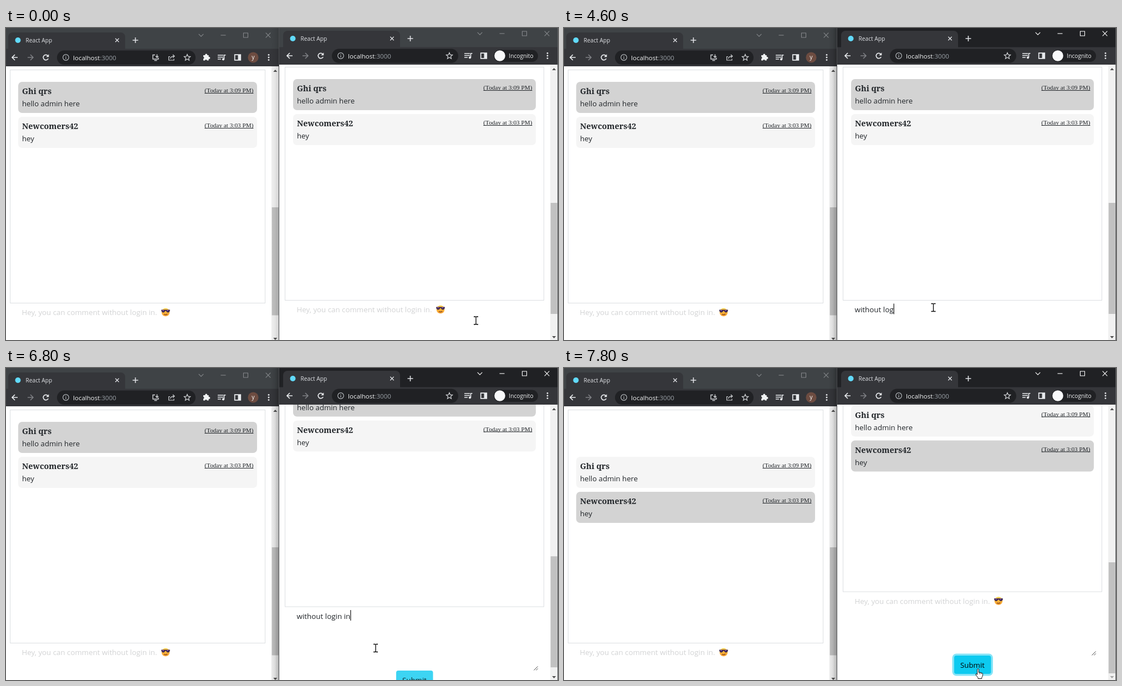
These frames come from a looping animation (996 by 562 pixels, 8 s). An HTML page with a canvas:

```html
<!DOCTYPE html>
<html lang="en">
<head>
<meta charset="utf-8">
<title>Comment box</title>
<style>
  html, body { margin: 0; width: 100%; height: 100%; overflow: hidden; background: #fff; }
  canvas { display: block; width: 996px; height: 562px; }
</style>
</head>
<body>
<canvas id="stage"></canvas>
<script>
const W = 996, H = 562, LOOP = 8000, TICK = 200 / 3;
const SANS = '"Open Sans", "Noto Sans", sans-serif';
const SERIF = '"Noto Serif", serif';
const TIMES = '"Liberation Serif", serif';

const MESSAGE = 'without login in';
const KEY_TIMES = [2000, 2200, 2470, 2670, 2930, 3400, 3600, 3730,
  4130, 4330, 4600, 4870, 5000, 5200, 5470, 5670];
const FOCUS = 1270, SCROLL_START = 6590, SCROLL_MS = 333, SCROLL_MAX = 87.5;
const HOVER = 7470, CLICK = 7730, POSTED = 7800, BLINK = 530;

const COMMENTS = [
  { name: 'Ghi qrs', body: 'hello admin here', time: '(Today at 3:09 PM)' },
  { name: 'Newcomers42', body: 'hey', time: '(Today at 3:03 PM)' },
];

// time, x, y, shape
const POINTER = [
  [0, 848, 527, 'beam'], [70, 826, 517, 'beam'], [130, 778, 491, 'beam'], [200, 757, 480, 'beam'],
  [800, 745, 484, 'beam'], [870, 722, 490, 'beam'], [930, 694, 497, 'beam'],
  [1000, 673, 502, 'beam'], [1070, 666.5, 503.5, 'beam'], [6670, 667, 504.5, 'beam'],
  [6930, 673, 507, 'beam'], [7000, 692, 513, 'beam'], [7070, 722, 530, 'hand'],
  [7130, 750, 545, 'hand'], [7200, 765.5, 552, 'arrow'], [7270, 767, 555, 'arrow'],
  [7400, 764, 554, 'arrow'], [7470, 751, 545, 'hand'], [7530, 747, 541.5, 'hand'],
];

const canvas = document.getElementById('stage');
const ctx = canvas.getContext('2d');
const dpr = window.devicePixelRatio || 1;
canvas.width = W * dpr;
canvas.height = H * dpr;

const clamp = v => Math.max(0, Math.min(1, v));
const smooth = v => v * v * (3 - 2 * v);

function rect(x, y, w, h, color) {
  ctx.fillStyle = color;
  ctx.fillRect(x, y, w, h);
}

function round(x, y, w, h, r, color) {
  ctx.beginPath();
  ctx.roundRect(x, y, w, h, r);
  ctx.fillStyle = color;
  ctx.fill();
}

function disc(x, y, r, color) {
  ctx.beginPath();
  ctx.arc(x, y, r, 0, Math.PI * 2);
  ctx.fillStyle = color;
  ctx.fill();
}

function text(str, x, y, font, color) {
  ctx.font = font;
  ctx.fillStyle = color;
  ctx.fillText(str, x, y);
  return ctx.measureText(str).width;
}

function at(x, y, draw) {
  ctx.save();
  ctx.translate(x, y);
  draw();
  ctx.restore();
}

// Paths are drawn around the given centre.
function stroke(d, x, y, color, width = 1.5) {
  at(x, y, () => {
    ctx.strokeStyle = color;
    ctx.lineWidth = width;
    ctx.stroke(new Path2D(d));
  });
}

function fill(d, x, y, color) {
  at(x, y, () => {
    ctx.fillStyle = color;
    ctx.fill(new Path2D(d));
  });
}

const CROSS = 'M-3.2 -3.2L3.2 3.2M3.2 -3.2L-3.2 3.2';
const PLUS = 'M-5 0H5M0 -5V5';
const ARROW_BACK = 'M5 0H-4.5M0 -5L-5 0L0 5';
const ARROW_NEXT = 'M-5 0H4.5M0 -5L5 0L0 5';
const RELOAD = 'M4.2 2A4.7 4.7 0 1 1 3.4 -3.2';
const STAR = 'M0 -5.6L1.6 -1.8L5.6 -1.5L2.5 1.2L3.5 5.2L0 3L-3.5 5.2L-2.5 1.2L-5.6 -1.5L-1.6 -1.8Z';
const PUZZLE = 'M-5.5 -3.5H-2.2A2 2 0 1 1 1.6 -3.5H4.2V-0.5A2 2 0 1 1 4.2 3.3V6H1.2A1.9 1.9 0 0 0 -2.5 6H-5.5V2.9A1.9 1.9 0 0 0 -5.5 -0.8Z';

function toolIcons(starX, mediaX, panelX, dotsX) {
  const ink = '#e8eaed';
  stroke(ARROW_BACK, 16, 53, ink, 1.7);
  stroke(ARROW_NEXT, 44, 53, '#7d7f83', 1.6);
  stroke(RELOAD, 72, 53, ink, 1.7);
  fill('M5.3 -5.8V-0.8H0.3Z', 72, 53, ink);
  stroke('M5.3 0A5.3 5.3 0 1 1 -5.3 0A5.3 5.3 0 1 1 5.3 0M0 -0.8V3M0 -3V-1.8', 108, 53, '#b4b8bc', 1.2);
  stroke(STAR, starX, 53, '#d0d2d5', 1.2);
  stroke('M-7 -4H3M-7 -0.5H3M-7 3H-1M4.5 3V-4.2H7.5', mediaX, 53, ink, 1.6);
  disc(mediaX + 3, 56.3, 2.1, ink);
  stroke('M-5.3 -4.8H5.3V4.8H-5.3Z', panelX, 53, ink, 1.7);
  rect(panelX + 0.6, 48.5, 4.6, 9, ink);
  for (const dy of [-4.6, 0, 4.6]) disc(dotsX, 53 + dy, 1.45, ink);
}

function windowButtons(x, color) {
  stroke('M-4.3 -2.2L0 2.2L4.3 -2.2', x, 13, color, 1.1);
  stroke('M-4.5 0H4.5', x + 40, 13, color, 1.1);
  stroke('M-4 -4H4V4H-4Z', x + 80.5, 13, color, 1.1);
  stroke('M-4.3 -4.3L4.3 4.3M4.3 -4.3L-4.3 4.3', x + 121, 13, color, 1.1);
}

function chrome(left, right, active, pillEnd, buttonsX) {
  rect(left, 0, right - left, 38, active ? '#202124' : '#3f4346');
  rect(left, 37.5, right - left, 31.5, '#35363a');
  round(4, 8, 211, 31, [8, 8, 0, 0], '#35363a');
  disc(21.5, 22, 5, '#61dafb');
  text('React App', 35.5, 26, `10.2px ${SANS}`, '#dfe1e5');
  stroke(CROSS, 200.5, 22, '#dfe1e5', 1.3);
  stroke(PLUS, 233.5, 22, '#dfe1e5', 1.6);
  windowButtons(buttonsX, active ? '#fff' : '#85888b');
  round(92, 40.5, pillEnd - 92, 25.5, 13, '#202124');
  const host = text('localhost', 121, 57.5, `11.55px ${SANS}`, '#f1f3f4');
  text(':3000', 121 + host, 57.5, `11.55px ${SANS}`, '#9aa0a6');
}

function leftChrome() {
  chrome(0, 493, false, 342, 352);
  toolIcons(327, 389, 418, 474);
  stroke('M-1 -4.5H-5V3H5V0.5M-2.5 5.5H2.5M2.5 -5.5V0M0 -2.2L2.5 0.3L5 -2.2', 270, 53, '#d0d2d5', 1.4);
  stroke('M-3 -1.5H-5.3V5H4V2.5M-2.5 2.2C-2 -1 0 -2.2 4.5 -2.2M2 -5L5 -2.2L2 0.6', 299, 53, '#d0d2d5', 1.2);
  fill(PUZZLE, 361.5, 52.5, '#f1f3f4');
  disc(446, 53, 9.6, '#6d4c41');
  text('y', 443.3, 56, `10.5px ${SANS}`, '#fff');
}

function rightChrome(active) {
  chrome(-3, 500, active, 320, 359);
  toolIcons(304, 338, 366, 481);
  round(384, 42.5, 80, 21.5, 10.8, '#202124');
  disc(395, 53, 9.8, '#f8f9fa');
  text('Incognito', 411.3, 56.8, `10.2px ${SANS}`, '#f1f3f4');
}

function card(c, x, y, w, shade) {
  round(x, y, w, 56, 7, shade);
  text(c.name, x + 7, y + 22, `bold 14.4px ${SERIF}`, '#212529');
  text(c.body, x + 7, y + 44, `13.2px ${SANS}`, '#212529');
  ctx.textAlign = 'right';
  const tw = text(c.time, x + w - 6.5, y + 19, `11.24px ${TIMES}`, '#212529');
  ctx.textAlign = 'left';
  rect(x + w - 6.5 - tw, y + 20, tw, 1, '#212529');
}

function list(x, y, w, posted) {
  ctx.strokeStyle = '#dcdfe2';
  ctx.lineWidth = 1;
  ctx.strokeRect(x + 0.5, y + 0.5, w, 420);
  COMMENTS.forEach((c, i) => {
    const slot = i + (posted ? 1 : 0);
    card(c, x + 15, y + 22 + slot * 63, w - 29, slot % 2 ? '#f5f5f5' : '#d3d3d3');
  });
}

function coolFace(x, y) {
  const skin = ctx.createLinearGradient(0, y - 8, 0, y + 8);
  skin.addColorStop(0, '#ffd24a');
  skin.addColorStop(1, '#f59a2c');
  disc(x, y, 7.3, skin);
  fill('M-7.8 -4.6H7.8V-3C7.2 1.4 2 1.6 0.9 -2.2H-0.9C-2 1.6 -7.2 1.4 -7.8 -3Z', x, y, '#3d2752');
  stroke('M-5.8 -3L-3.2 -3.3M2.4 -3L5 -3.3', x, y, '#8d62b5', 1.4);
  stroke('M-3 3.6Q0.3 5.5 3.2 3', x, y, '#7c3f22', 1.1);
}

function placeholder(x, y) {
  text('Hey, you can comment without login in.', x, y, `13.3px ${SANS}`, '#d2d3d4');
  coolFace(x + 259.5, y - 5);
}

function scrollbar(x, top, bottom, thumbY, thumbH, upY, downY, atEnd) {
  rect(x, top, 13, bottom - top, '#f1f1f1');
  rect(x + 0.7, thumbY, 12, thumbH, '#c1c1c1');
  fill('M-3.5 2L0 -2L3.5 2Z', x + 6.8, upY, '#505050');
  fill('M-3.5 -2L0 2L3.5 -2Z', x + 6.8, downY, atEnd ? '#a3a3a3' : '#505050');
}

function leftWindow(t) {
  rect(0, 69, 493, 493, '#fff');
  list(7, 75, 460, t >= POSTED);
  placeholder(28.5, 517);
  scrollbar(479, 69, H, 323, 194.5, 77, 560, false);
  leftChrome();
  // Shade cast by the window on the right
  const depth = t >= FOCUS ? 0.28 : 0.14;
  const shade = ctx.createLinearGradient(477, 0, 493, 0);
  shade.addColorStop(0, 'rgba(0,0,0,0)');
  shade.addColorStop(0.5, `rgba(0,0,0,${depth * 0.3})`);
  shade.addColorStop(1, `rgba(0,0,0,${depth})`);
  rect(477, 0, 16, H, shade);
}

function submitButton(t, y) {
  if (t >= CLICK) {
    const ring = 1.75 + 1.75 * clamp((t - CLICK) / 70);
    round(704 - ring, y - ring, 66.5 + ring * 2, 33 + ring * 2, 4 + ring, '#86e4f7');
  }
  ctx.globalAlpha = t < HOVER ? 0.8 : t < HOVER + 60 ? 0.9 : 1;
  round(704, y, 66.5, 33, 3.8, '#0dcaf0');
  text('Submit', 715, y + 22.3, `13.3px ${SANS}`, '#000');
  ctx.globalAlpha = 1;
}

function field(t, y) {
  const x = 524.5;
  const typed = KEY_TIMES.filter(k => k <= t).length;
  let caretX = x;
  if (!typed || t >= POSTED) placeholder(x, y);
  else caretX += text(MESSAGE.slice(0, typed), x, y, `13.4px ${SANS}`, '#212529');
  if (t < FOCUS || t >= CLICK) return;
  const last = typed ? KEY_TIMES[typed - 1] : FOCUS;
  if (Math.floor((t - last) / BLINK) % 2 === 0) rect(caretX, y - 15.5, 1.2, 19, '#111');
}

function scrollAt(t) {
  const frame = Math.floor(t / TICK + 0.05) * TICK;
  const s = SCROLL_MAX * smooth(clamp((frame - SCROLL_START) / SCROLL_MS));
  return Math.round(s * 2) / 2;
}

function rightWindow(t) {
  const scroll = scrollAt(t);
  rect(493, 66, 503, 496, '#fff');
  list(503, 70 - scroll, 467, t >= POSTED);
  field(t, 512 - scroll);
  stroke('M-3.5 3.5L3.5 -3.5M0.3 3.5L3.5 0.3', 956, 601.5 - scroll, '#444', 1);
  submitButton(t, 605.5 - scroll);
  scrollbar(982, 66, H, 315 + scroll * 0.4, 200, 74, 557, scroll === SCROLL_MAX);
  at(496, -3, () => rightChrome(t >= FOCUS));
  rect(492, 0, 1, H, '#4a4c4f');
  rect(995, 0, 1, H, '#5a5c5f');
}

const BEAM = 'M-4 -7H-1.2L0 -6.2L1.2 -7H4M0 -6.2V6.2M-4 7H-1.2L0 6.2L1.2 7H4';
const TIP = 'M0 0V14.5L3.4 11.3L5.8 16.5L8 15.5L5.7 10.5H10.3Z';
const HAND = 'M-1.3 1Q0 -0.8 1.3 1V7L2.6 6.4L4 7.4L5.4 7L6.6 8.2L8 8.2Q8.6 9 8.5 11Q8.4 14.5 6.8 16V18H0V16.2L-4 11.2Q-4.6 9.2 -2.8 9.4L-1.3 10.8Z';

function pointer(t) {
  const [, x, y, shape] = POINTER.filter(p => p[0] <= t).pop();
  if (shape === 'beam') {
    stroke(BEAM, x, y, '#fff', 2.6);
    stroke(BEAM, x, y, '#000', 1.3);
    return;
  }
  const d = shape === 'hand' ? HAND : TIP;
  fill(d, x, y, '#fff');
  stroke(d, x, y, '#111', 1);
  if (shape === 'hand') stroke('M2.6 7V10M5.4 7.4V10', x, y, '#111', 0.8);
}

function draw(now) {
  const t = now % LOOP;
  ctx.setTransform(dpr, 0, 0, dpr, 0, 0);
  leftWindow(t);
  rightWindow(t);
  pointer(t);
}

const start = performance.now();
function loop(now) {
  draw(Math.max(0, now - start));
  requestAnimationFrame(loop);
}
draw(0);
requestAnimationFrame(loop);
</script>
</body>
</html>
```
